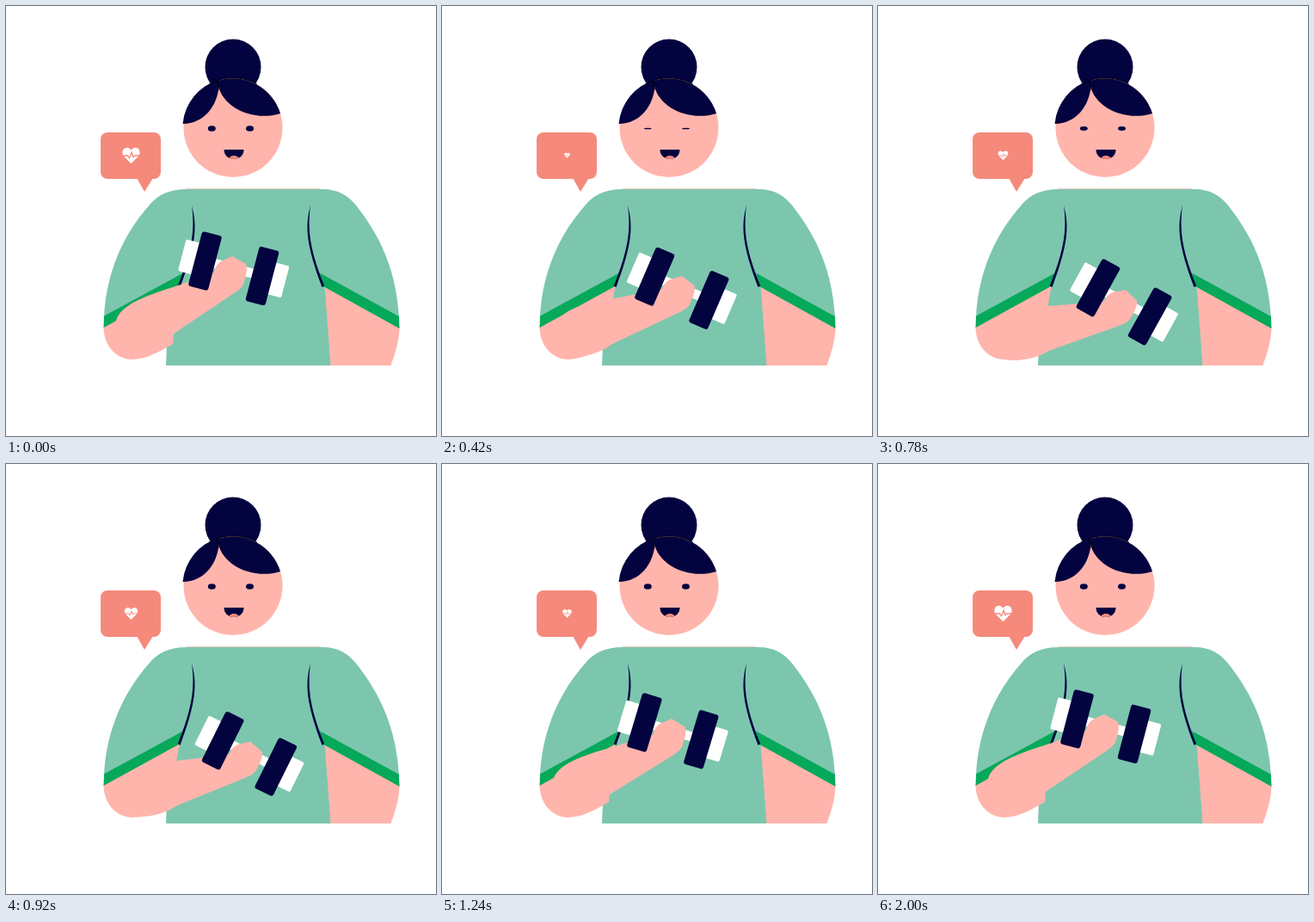
Recreate the animation shown at these times as an HTML page. Size 500x500 px, loop 2020 ms.

```html
<!DOCTYPE html>
<html>
<head>
<meta charset="utf-8">
<style>
html, body { margin: 0; width: 100%; height: 100%; overflow: hidden; background: #fff; }
svg { display: block; width: 100vw; height: 100vh; }
.skin { fill: #ffb5ac; }
.shirt { fill: #7cc6ae; }
.band { fill: #06a85a; }
.navy { fill: #03033f; }
.coral { fill: #f58a7c; }
.white { fill: #fff; }
</style>
</head>
<body>
<svg viewBox="0 0 500 500">
  <defs>
    <path id="seam" class="navy" d="M216 232C222 255 222 275 202.500 327L199.800 325.500C216 285 220 262 216 232Z"/>
    <clipPath id="lips"><path id="mouth" d="M253.500 167H276.500C276.500 174 271 178 265 178S253.500 174 253.500 167Z"/></clipPath>
  </defs>

  <!-- speech bubble -->
  <g class="coral">
    <rect x="110" y="147" width="70" height="54" rx="8"/>
    <path d="M152 200H171L161 216Z"/>
  </g>
  <g id="heart">
    <path class="white" d="M0 9.500L-8.500 1C-12 -3 -9.500 -9 -5 -9C-2.500 -9 -1 -7.500 0 -6C1 -7.500 2.500 -9 5 -9C9.500 -9 12 -3 8.500 1Z"/>
    <path fill="none" stroke="#f58a7c" stroke-width="1.300" d="M-11 .3H-4L-2 3L.7 -3.500L2.500 2L4 .3H11"/>
  </g>

  <!-- head -->
  <circle class="navy" cx="264" cy="71" r="32.500"/>
  <circle class="skin" cx="264" cy="141.500" r="57.500"/>
  <g class="navy">
    <path d="M205.500 137A58.500 58.500 0 0 1 247.500 86V93C246 116 230 137 205.500 137Z"/>
    <path d="M246 87A58 58 0 0 1 319 125C286 135 252 117 247 93Z"/>
    <path fill="none" stroke="#000" stroke-width=".8" d="M236 91A58 58 0 0 1 292 91M247 86V98"/>
    <ellipse class="eye" rx="4.500" ry="3.200" data-x="239.300"/>
    <ellipse class="eye" rx="4.500" ry="3.200" data-x="283.500"/>
    <use href="#mouth"/>
  </g>
  <ellipse class="coral" cx="265" cy="177.500" rx="5.500" ry="3.500" clip-path="url(#lips)"/>

  <!-- body -->
  <path class="shirt" d="M210 213H365C385 212 398 220 408 233C437 270 454 310 457 362L371 320L378 418H186L187 393L202 322L114 362C116 320 130 272 168 230C176 220 190 213 210 213Z"/>
  <path fill="none" stroke="#ffb5ac" stroke-width=".7" d="M210 212.500H365"/>
  <path class="skin" d="M370.500 325L457.500 373C457.500 390 452 405 447.500 418H377.500Z"/>
  <path class="skin" d="M113.500 372L202 324L198 346L194 393C180 401 163 411 147 411C126 411 113 392 113.500 372Z"/>
  <path class="band" d="M365 310.500L457 361L457.500 375L369 326Z"/>
  <path class="band" d="M206 310.500L114 360.500L113.500 374L201 326Z"/>
  <use href="#seam"/>
  <use href="#seam" transform="matrix(-1 0 0 1 570 0)"/>

  <!-- forearm and dumbbell -->
  <g id="arm">
    <g class="white" transform="translate(264.750 305.250) rotate(14.700)">
      <rect x="-62" y="-19" width="28" height="38" rx="2"/>
      <rect x="34" y="-19" width="28" height="38" rx="2"/>
      <rect x="-34" y="-5.500" width="68" height="11"/>
    </g>
    <path class="skin" d="M128 366C132 352 148 344 165 337C180 331 195 327 211 321L242 310C243 305 245 300 250 297L263 291L279 300C281 306 279 313 277 321C275 327 271 330 265 334L195 381L187 388C178 395 165 401 150 404C128 404 118 380 128 366Z"/>
    <g class="navy" transform="translate(264.750 305.250) rotate(14.700)">
      <rect x="-46.300" y="-32.800" width="23.800" height="65.600" rx="3"/>
      <rect x="22.500" y="-32.800" width="23.800" height="65.600" rx="3"/>
    </g>
  </g>
</svg>
<script>
const LOOP = 2020;
const heart = document.getElementById('heart');
const arm = document.getElementById('arm');
const eyes = document.querySelectorAll('.eye');

// [time, value] keys
const ARM = [[36, 0], [722, 14.5], [1408, 0]];
const BLINK = [[60, 1], [500, .2], [940, 1]];
const BEAT = [[0, 1], [480, .3], [1050, .82], [1480, .1], [2000, 1]];

// Value at time t, with a sine ease between neighbouring keys
function at(keys, t) {
  const i = keys.findIndex(k => k[0] > t);
  if (i < 0) return keys[keys.length - 1][1];
  if (i === 0) return keys[0][1];
  const [t0, a] = keys[i - 1], [t1, b] = keys[i];
  return a + (b - a) * (1 - Math.cos(Math.PI * (t - t0) / (t1 - t0))) / 2;
}

function draw(now) {
  const t = now % LOOP;
  arm.setAttribute('transform', `rotate(${at(ARM, t)} 119 410)`);
  heart.setAttribute('transform', `translate(145.5 173.7) scale(${at(BEAT, t)})`);
  for (const eye of eyes)
    eye.setAttribute('transform', `translate(${eye.dataset.x} 142.500) scale(1 ${at(BLINK, t)})`);
}

const start = performance.now();
function tick() {
  draw(performance.now() - start);
  requestAnimationFrame(tick);
}
tick();
</script>
</body>
</html>
```
